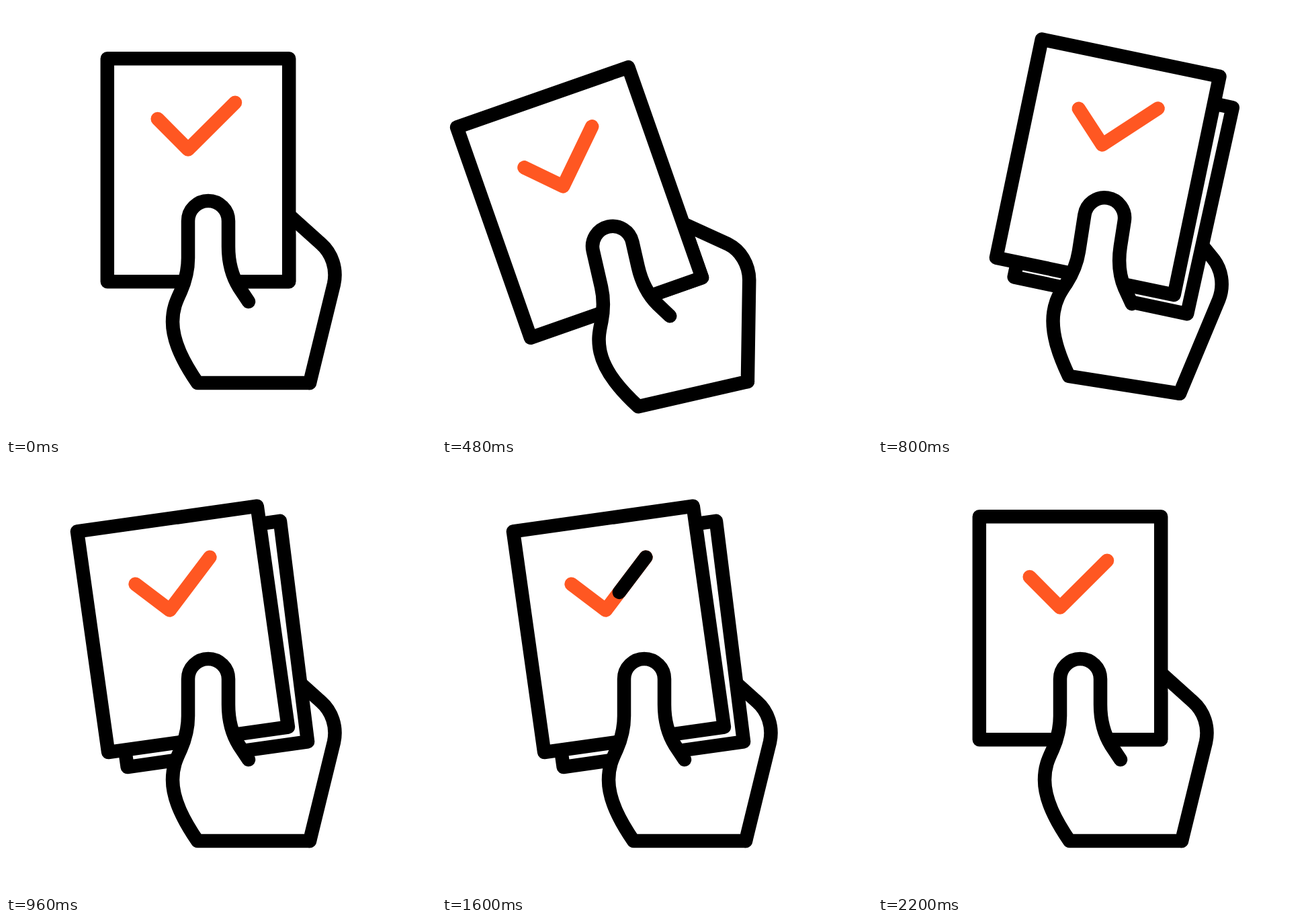
These frames come from a looping animation (640x640 px, 3 s). An HTML page without scripts:

```html
<!DOCTYPE html>
<html lang="en">
<head>
<meta charset="utf-8">
<title>Ballot in hand</title>
<style>
html, body { margin: 0; width: 100%; height: 100%; overflow: hidden; background: #fff; }
svg { display: block; width: 100%; height: 100%; }

.line { fill: none; stroke: #000; stroke-width: 20.5; stroke-linecap: round; stroke-linejoin: round; }
.solid { fill: #fff; }
.mark { stroke: #ff5722; }

.hand, .card, .sheet, .finger, .ink {
  animation: 3s infinite cubic-bezier(.37, 0, .63, 1);
}
.hand { transform-origin: 369px 561px; animation-name: sway, drift; }
.card { transform-origin: 286px 410px; animation-name: tilt; }
.sheet { animation-name: fan; }
.finger { animation-name: bend; }
.ink { stroke-dasharray: 100 400; animation-name: ink; animation-timing-function: linear; }

@keyframes sway {
  0%, 10.167% { rotate: 0deg; }
  17.333% { rotate: -13.95deg; animation-timing-function: ease-in; }
  21.333% { rotate: 2.7deg; animation-timing-function: ease-out; }
  24.267% { rotate: 14.1deg; animation-timing-function: ease-in; }
  26.667% { rotate: 9deg; animation-timing-function: ease-out; }
  31%, 61.333% { rotate: 0deg; }
  70% { rotate: 4deg; }
  73.333%, 100% { rotate: 0deg; }
}

@keyframes drift {
  0%, 10.167% { translate: 0 0; animation-timing-function: ease-in; }
  16% { translate: 5px 16.3px; animation-timing-function: ease-out; }
  17.667% { translate: 4px 24px; }
  21.333% { translate: -2.7px 13px; animation-timing-function: ease-out; }
  24.267% { translate: -2px 4px; animation-timing-function: linear; }
  26.667% { translate: -2px 3px; animation-timing-function: ease-out; }
  31%, 61.333% { translate: 0 0; }
  70% { translate: 0 -5.8px; }
  73.333%, 100% { translate: 0 0; }
}

@keyframes tilt {
  0%, 10.167% { rotate: 0deg; }
  17.333% { rotate: -7deg; animation-timing-function: ease-in; }
  21.333% { rotate: 2.1deg; animation-timing-function: ease-out; }
  24.267% { rotate: 8.6deg; animation-timing-function: ease-in; }
  26.667% { rotate: 3.05deg; animation-timing-function: ease-out; }
  31%, 63.333% { rotate: -8deg; }
  73.333%, 100% { rotate: 0deg; }
}

@keyframes fan {
  0%, 21.667% { d: path("M280 340 L421 340 L421 410 L280 410 Z"); }
  26.667% { d: path("M183 120 L449.5 120 L446 434 L183 433 Z"); animation-timing-function: ease-out; }
  29.333%, 63.333% { d: path("M176 105 L452 105 L447 436 L176 436 Z"); }
  73.333%, 100% { d: path("M280 340 L421 340 L421 410 L280 410 Z"); }
}

@keyframes bend {
  0%, 10.167%, 21.333%, 100% { d: path("M400 292 L469 354 C485 368 493 391 488 414 L452 561"); }
  17.333% { d: path("M400 303 L469 355 C485 368 493 391 488 414 L452 561"); }
}

/* Black stroke runs along the tick, then clears from its start */
@keyframes ink {
  0%, 33.2% { stroke-dashoffset: 110; }
  45.333% { stroke-dashoffset: 0; }
  58.9%, 100% { stroke-dashoffset: -101; }
}
</style>
</head>
<body>
<svg viewBox="0 0 640 640">
  <g class="hand">
    <path class="line finger" d="M400 292 L469 354 C485 368 493 391 488 414 L452 561"/>
    <g class="card">
      <path class="line solid sheet" d="M280 340 L421 340 L421 410 L280 410 Z"/>
      <rect class="line solid" x="150.8" y="78.3" width="270.4" height="332"/>
      <path class="line mark" d="M225.7 168 L271 213.5 L341 143.7"/>
      <path class="line ink" pathLength="100" d="M225.7 168 L271 213.5 L341 143.7"/>
    </g>
    <path class="line solid" d="M452 561 H285 C266 533 248 501 248 470 C248 450 254 438 260 425 C267 409 271 394 271 375 V320 A30 30 0 0 1 331 320 V358 C331 383 337 403 347 419 L361 440"/>
  </g>
</svg>
</body>
</html>
```
